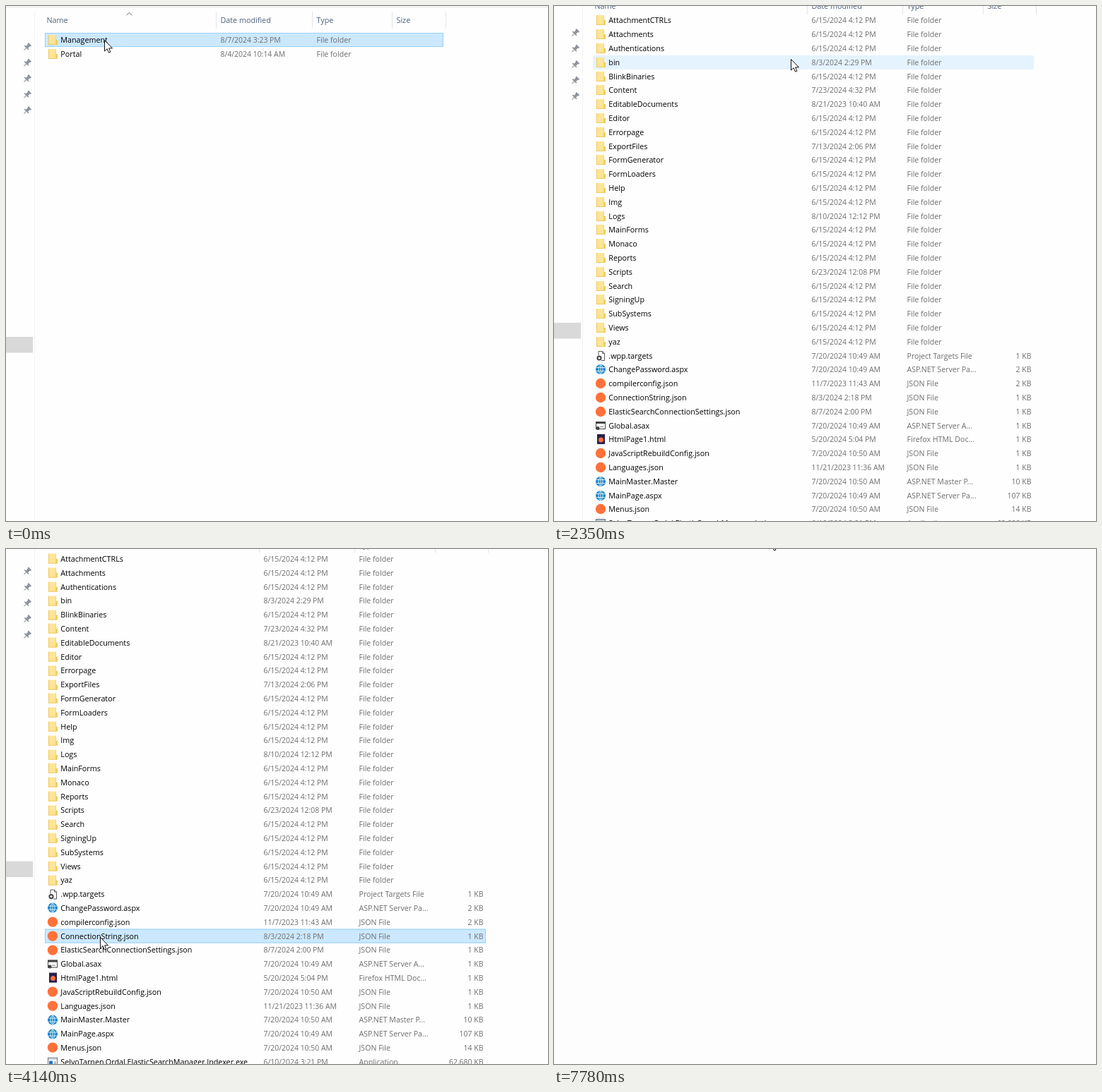
Write an HTML page with a canvas that moves like this. It is 767 px wide and 730 px high and loops after 8000 ms.

```html
<!DOCTYPE html>
<html lang="en">
<head>
<meta charset="utf-8">
<title>File explorer</title>
<style>
html, body { margin: 0; width: 100%; height: 100%; overflow: hidden; background: #fdfdfd; }
canvas { display: block; }
</style>
</head>
<body>
<canvas id="stage" width="767" height="730"></canvas>
<script>
const ctx = document.getElementById('stage').getContext('2d');
const LOOP = 8000, PITCH = 19.8;
const FONT = '"Open Sans", "Noto Sans", sans-serif';

// name|modified|type|size; missing fields mean an ordinary folder
const parse = text => text.trim().split('\n').map(line => {
  const [name, date = '6/15/2024 4:12 PM', type = 'File folder', size = ''] = line.split('|');
  return { name, date, type, size };
});

const parentFolder = {
  rows: parse(`
Management|8/7/2024 3:23 PM
Portal|8/4/2024 10:14 AM`),
  top: 38, right: 619, separators: [297, 433, 546, 622], arrow: 174.5
};

const siteFolder = {
  rows: parse(`
AttachmentCTRLs
Attachments
Authentications
bin|8/3/2024 2:29 PM
BlinkBinaries
Content|7/23/2024 4:32 PM
EditableDocuments|8/21/2023 10:40 AM
Editor
Errorpage
ExportFiles|7/13/2024 2:06 PM
FormGenerator
FormLoaders
Help
Img
Logs|8/10/2024 12:12 PM
MainForms
Monaco
Reports
Scripts|6/23/2024 12:08 PM
Search
SigningUp
SubSystems
Views
yaz
.wpp.targets|7/20/2024 10:49 AM|Project Targets File|1 KB
ChangePassword.aspx|7/20/2024 10:49 AM|ASP.NET Server Pa...|2 KB
compilerconfig.json|11/7/2023 11:43 AM|JSON File|2 KB
ConnectionString.json|8/3/2024 2:18 PM|JSON File|1 KB
ElasticSearchConnectionSettings.json|8/7/2024 2:00 PM|JSON File|1 KB
Global.asax|7/20/2024 10:49 AM|ASP.NET Server A...|1 KB
HtmlPage1.html|5/20/2024 5:04 PM|Firefox HTML Doc...|1 KB
JavaScriptRebuildConfig.json|7/20/2024 10:50 AM|JSON File|1 KB
Languages.json|11/21/2023 11:36 AM|JSON File|1 KB
MainMaster.Master|7/20/2024 10:50 AM|ASP.NET Master P...|10 KB
MainPage.aspx|7/20/2024 10:49 AM|ASP.NET Server Pa...|107 KB
Menus.json|7/20/2024 10:50 AM|JSON File|14 KB
SelvoTarnen.Ordal.ElasticSearchManager.Indexer.exe|6/10/2024 3:21 PM|Application|62,680 KB`),
  top: 30.4, right: 679, separators: [358, 493, 607, 682], arrow: 205
};
const SELECTED_ROW = 27;

// '-' starts a new group
const menuLabels = `Open
Share with Plimo
Edit with Notepad++
Open with Code
Scan with Brelmonta Guardian...
Share
Open with
Add to archive...
Add to "ConnectionString.rar"
Compress and email...
Compress to "ConnectionString.rar" and email
Restore previous versions
-Send to
-Cut
Copy
-Create shortcut
Delete
Rename
-Properties`.split('\n');

// time, tip x, tip y, and the height used for hover when it lags behind
const arrowSteps = [
  [0, 139, 48], [790, 353, 447], [910, 352, 375], [1040, 351, 285], [1160, 350, 190],
  [1280, 349, 95], [1420, 347, 45], [1560, 346, 24], [1680, 345, 10], [1800, 343, -18],
  [1940], [2350, 335, 75], [2500, 325, 118], [2870, 321, 128, 118], [2990, 270, 250],
  [3110, 175, 455], [3230, 109, 560], [3370, 118, 560], [3490, 127, 560], [3640, 131, 555],
  [3760, 133, 551], [3900, 132, 551], [4020, 131, 550], [4140, 133, 550], [4940, 130, 530],
  [5060, 138, 465], [5180, 147, 387], [5330, 163, 287, 300], [5450, 166, 235],
  [5570, 168, 192], [5710, 169, 178], [5850, 170, 175], [6860], [7780, 305, -16]
];
const beamSteps = [[0], [6860, 174.5, 176.5], [7120, 181.5, 176.5], [7260, 218, 110], [7380, 276, 9], [7500]];
const panSteps = [[0, 0], [2230, -9], [2350, -20], [2500, -26.4]];
const fadeSteps = [[0, 0], [6620, .5], [6740, .85], [6860, 1]];

const stepAt = (steps, t) => steps.findLast(step => step[0] <= t);

function rect(x, y, w, h, fill) {
  ctx.fillStyle = fill;
  ctx.fillRect(x, y, w, h);
}

function frame(x, y, w, h, fill, stroke) {
  rect(x, y, w, h, fill);
  ctx.strokeStyle = stroke;
  ctx.lineWidth = 1;
  ctx.strokeRect(x + .5, y + .5, w - 1, h - 1);
}

function circle(x, y, r, fill) {
  ctx.fillStyle = fill;
  ctx.beginPath();
  ctx.arc(x, y, r, 0, 7);
  ctx.fill();
}

function line(points, stroke, width = 1) {
  ctx.strokeStyle = stroke;
  ctx.lineWidth = width;
  ctx.beginPath();
  points.forEach(([x, y]) => ctx.lineTo(x, y));
  ctx.stroke();
}

function label(text, x, y, color, size = 10.75, align = 'left', weight = '') {
  ctx.font = `${weight} ${size}px ${FONT}`;
  ctx.textAlign = align;
  ctx.fillStyle = color;
  ctx.fillText(text, x, y + 4);
}

function at(x, y, draw) {
  ctx.save();
  ctx.translate(x, y);
  draw();
  ctx.restore();
}

// icons are drawn around their centre
function globe() {
  circle(0, 0, 7, '#1583c5');
  ctx.strokeStyle = '#e4f4fc';
  ctx.lineWidth = .9;
  ctx.beginPath();
  ctx.ellipse(0, 0, 3, 6.3, 0, 0, 7);
  ctx.stroke();
  for (const y of [-2.5, 2.5]) line([[-6, y], [6, y]], '#e4f4fc', .9);
  line([[0, -6], [0, 6]], '#e4f4fc', .9);
}

const icons = {
  folder() {
    rect(-6, -7, 11, 14, '#ffe594');
    rect(-6, -7, 1, 14, '#efc65c');
    rect(-6, 6, 11, 1, '#f0c75e');
    rect(4, -7, 1, 8, '#f5d476');
    rect(4, 0, 3, 7, '#f4cc63');
  },
  targets() {
    line([[-3, -1], [-3, -6.5], [2.5, -6.5], [5.5, -3.5], [5.5, 6.5], [1, 6.5]], '#555');
    line([[2.5, -6.5], [2.5, -3.5], [5.5, -3.5]], '#555');
    circle(-2, 3, 3.6, '#444');
    circle(-2, 3, 1.6, '#fff');
  },
  aspx: globe,
  Master: globe,
  json() { circle(0, 0, 7.2, '#ff7139'); },
  asax() {
    frame(-7, -6, 14, 11, '#fff', '#444');
    rect(-7, -6, 14, 3, '#444');
    circle(-4, 3.5, 2.5, '#444');
    line([[-1, 1.5], [4, 1.5]], '#777');
  },
  html() {
    rect(-5, -7, 11, 14, '#27204e');
    circle(.5, 1, 3.5, '#ff7139');
  },
  exe() {
    frame(-7, -6, 14, 12, '#fff', '#6d7680');
    rect(-6, -5, 12, 2, '#b9c4ce');
    rect(-5, -1, 5, 5, '#1976d2');
    line([[2, .5], [5, .5]], '#777');
    line([[2, 2.5], [5, 2.5]], '#777');
  }
};

function pin() {
  ctx.rotate(Math.PI / 4);
  rect(-3, -5.5, 6, 2, '#8b929a');
  rect(-2, -4, 4, 5, '#8b929a');
  rect(-4, .5, 8, 1.6, '#8b929a');
  rect(-.5, 2, 1, 4.5, '#8b929a');
}

function sidebar() {
  rect(0, 1, 767, 1, '#e3e3e3');
  rect(40, 8, 1, 760, '#f3f3f3');
  rect(0, 469, 38, 22.5, '#d9d9d9');
  for (let i = 0; i < 5; i++) at(30, 58 + 22.5 * i, pin);
}

function header({ separators, arrow }, hovered) {
  if (hovered) rect(41, 8, separators[0] - 41, 24, '#d9ebf9');
  separators.forEach(x => rect(x, 8, 1, 24, '#e5e5e5'));
  ['Name', 'Date modified', 'Type', 'Size'].forEach((title, i) =>
    label(title, i ? separators[i - 1] + 6.5 : 57.5, 20.3, '#4c607a'));
  line([[arrow - 4, 13], [arrow, 9.5], [arrow + 4, 13]], '#707070');
}

function rowBackground(folder, row, fill, border = fill) {
  const y = Math.round(folder.top + row * PITCH);
  frame(55, y, folder.right - 55, 20, fill, border);
}

function list(folder) {
  const [dateX, typeX] = folder.separators.map(x => x + 6.5);
  folder.rows.forEach(({ name, date, type, size }, i) => {
    const y = folder.top + (i + .5) * PITCH;
    const kind = type === 'File folder' ? 'folder' : name.split('.').pop();
    at(66, Math.round(y), icons[kind]);
    label(name, 77.3, y, '#000');
    label(date, dateX, y, '#6d6d6d', 10.45);
    label(type, typeX, y, '#6d6d6d', 10.6);
    label(size, 675.5, y, '#6d6d6d', 10.5, 'right');
  });
}

function menuIcon(i, y) {
  const square = { 2: '#9ac53c', 3: '#1f8ad2', 4: '#0f6cbd' }[i];
  if (i === 1) circle(150.5, y, 6.5, '#28a8ea');
  else if (square) rect(144, y - 6.5, 13, 13, square);
  else if (i === 5) {
    line([[148, y - 3], [144.5, y - 3], [144.5, y + 5.5], [154.5, y + 5.5], [154.5, y + 2]], '#444');
    line([[147, y + 2], [149, y - 1.5], [156, y - 1.5]], '#444');
    line([[152.5, y - 5.5], [156.5, y - 1.5], [152.5, y + 2]], '#444');
  } else if (i >= 7 && i <= 10) rect(143.5, y - 7, 14, 14, '#8b3f72');
}

function menu(hoverY) {
  frame(133, 120, 338, 430, '#eee', '#a0a0a0');
  let groups = 0;
  menuLabels.forEach((text, i) => {
    const startsGroup = text.startsWith('-');
    if (startsGroup) groups++;
    const y = 134.7 + 20.7 * i + 6.75 * groups;
    if (startsGroup) rect(143, Math.round(y - 14.2), 317, 1, '#919191');
    if (Math.abs(hoverY - y) < 10.35) rect(136, Math.round(y - 10.3), 332, 21, '#fff');
    menuIcon(i, y);
    label(text.replace('-', ''), 166, y, '#000', 10.8, 'left', i ? '' : 'bold');
    if (/^-?(Open with|Send to)$/.test(text))
      line([[453, y - 5.5], [459.5, y], [453, y + 5.5]], '#444');
  });
}

function arrowCursor(x, y) {
  at(x + .5, y + .5, () => {
    ctx.beginPath();
    [[0, 0], [0, 15.5], [3.6, 12.2], [6, 17.7], [8.4, 16.7], [6.1, 11.4], [11, 11.4]]
      .forEach(([px, py]) => ctx.lineTo(px, py));
    ctx.closePath();
    ctx.fillStyle = '#fff';
    ctx.fill();
    ctx.strokeStyle = '#111';
    ctx.lineWidth = 1;
    ctx.stroke();
  });
}

function beamCursor(x, y) {
  rect(x - .5, y - 7, 1, 14, '#111');
  for (const end of [-7.5, 6.5]) rect(x - 3.5, y + end, 7, 1, '#111');
}

function folderView(t, hoverY) {
  const pan = stepAt(panSteps, t)[1];
  ctx.save();
  ctx.translate(0, pan);
  sidebar();
  if (t < 150) {
    header(parentFolder);
    rowBackground(parentFolder, 0, '#cce8ff', '#99d1ff');
    list(parentFolder);
  } else {
    header(siteFolder, t >= 1560 && t < 1800);
    if (t >= 270) {
      const menuOpen = t >= 4540 && t < 5990;
      const hoverRow = Math.floor((hoverY - pan - siteFolder.top) / PITCH);
      if (hoverRow >= 0 && !menuOpen && t < 6250) rowBackground(siteFolder, hoverRow, '#e5f3ff');
      if (t >= 6370) rowBackground(siteFolder, SELECTED_ROW, '#d9d9d9');
      else if (t >= 3760) rowBackground(siteFolder, SELECTED_ROW, '#cce8ff', '#99d1ff');
      list(siteFolder);
    }
  }
  ctx.restore();
}

function draw(t) {
  const [, x, y, hoverY = y] = stepAt(arrowSteps, t);
  const fade = stepAt(fadeSteps, t)[1];
  rect(0, 0, 767, 730, '#fefefe');
  if (fade < 1) folderView(t, hoverY);
  if (t >= 4540 && t < 5990) menu(t >= 5330 ? hoverY : -1);
  ctx.globalAlpha = fade;
  rect(0, 0, 767, 730, '#fdfdfd');
  ctx.globalAlpha = 1;
  if (x !== undefined) arrowCursor(x, y);
  const [, beamX, beamY] = stepAt(beamSteps, t);
  if (beamX !== undefined) beamCursor(beamX, beamY);
}

const start = performance.now();
function tick() {
  draw((performance.now() - start) % LOOP);
  requestAnimationFrame(tick);
}
tick();
</script>
</body>
</html>
```
